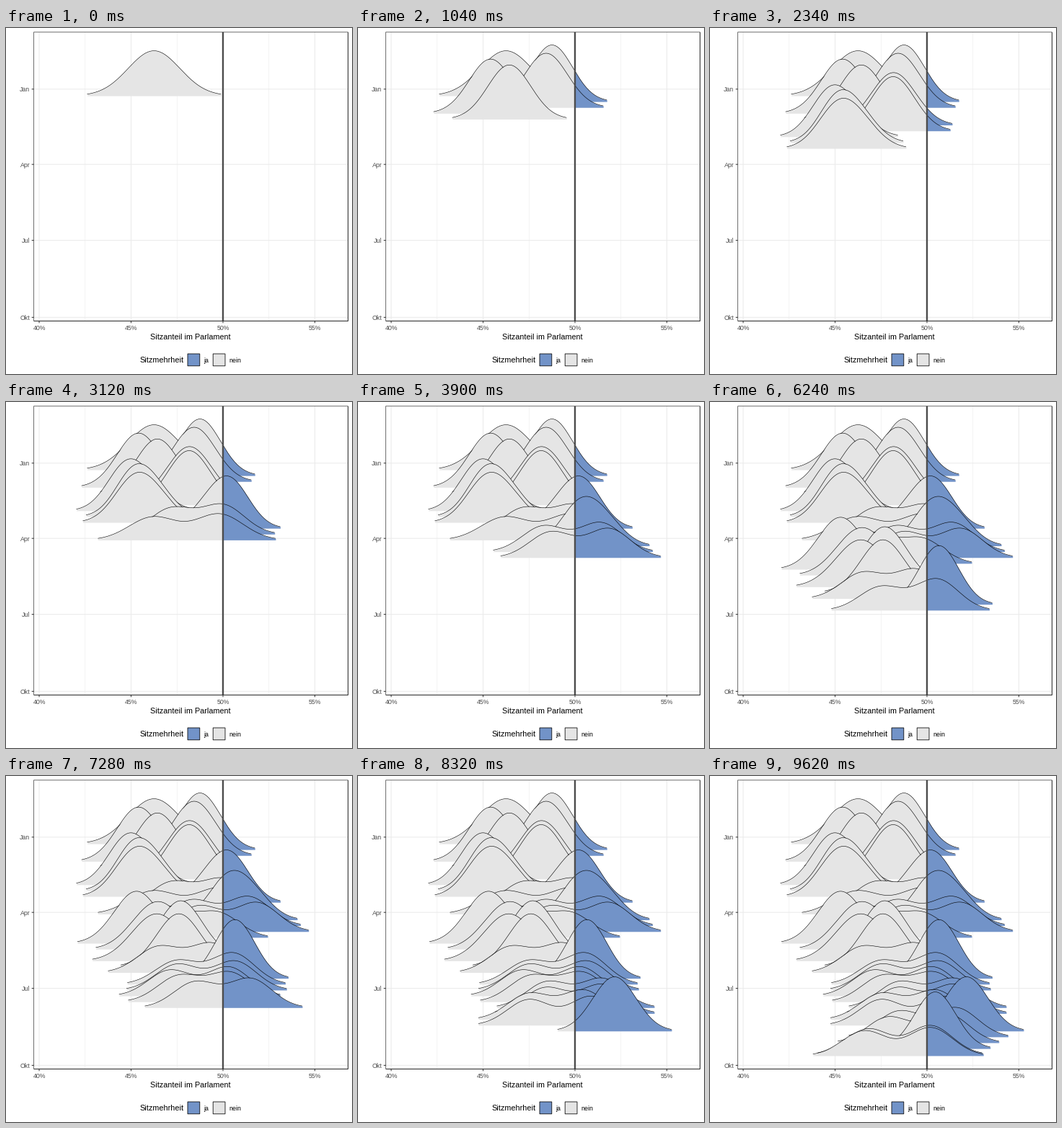
Animation, 480 px wide and 480 px high, one loop 9880 ms. Source, as a matplotlib script:

```python
import matplotlib.pyplot as plt
import numpy as np
from matplotlib.animation import FuncAnimation
from matplotlib.patches import Rectangle

STAGE, DPI = 480, 100
PX = 72 / DPI                            # points per pixel
LEFT, RIGHT, TOP, BOTTOM = 38.5, 474.5, 5.8, 406.5
MAJORITY, PERCENT = 301, 25.5            # x of 50 %, pixels per point
FIRST, WEEK, LAST = 94, 8.118, 388       # baselines: first, weekly step, last
AREA = 88                                # pixel height times percent
CUTOFF = 2.2                             # tails lower than this are dropped
YES, NO, GREY, DARK, GRID = "#7293c8", "#e5e5e5", "#4d4d4d", "#333333", "#ebebeb"

plt.rcParams["font.family"] = "Liberation Sans"
plt.rcParams["path.snap"] = False
fig = plt.figure(figsize=(STAGE / DPI, STAGE / DPI), dpi=DPI, facecolor="white")
ax = fig.add_axes([0, 0, 1, 1])
ax.set_xlim(0, STAGE)
ax.set_ylim(STAGE, 0)
ax.axis("off")


def line(xs, ys, color, width, z):
    return ax.plot(xs, ys, color=color, lw=width * PX, zorder=z,
                   solid_capstyle="butt", solid_joinstyle="round")[0]


def label(x, y, text, size, color="black", ha="left"):
    ax.text(x, y, text, fontsize=size * PX, color=color, ha=ha, va="baseline")


def share_x(percent):
    return MAJORITY + (percent - 50) * PERCENT


def draw_panel():
    for p in (42.5, 47.5, 52.5):
        line([share_x(p)] * 2, [TOP, BOTTOM], GRID, 0.55, 0)
    for p in (40, 45, 50, 55):
        x = share_x(p)
        line([x, x], [TOP, BOTTOM], GRID, 1.07, 0)
        line([x, x], [BOTTOM, BOTTOM + 2.8], DARK, 1.07, 90)
        label(x, 419, f"{p}%", 8.8, GREY, "center")
    for name, y in (("Jan", 84.8), ("Apr", 189.2), ("Jul", 294.6), ("Okt", 401.4)):
        line([LEFT, RIGHT], [y, y], GRID, 1.07, 0)
        line([LEFT - 2.8, LEFT], [y, y], DARK, 1.07, 90)
        label(33.5, y + 3.4, name, 8.8, GREY, "right")
    line([MAJORITY] * 2, [TOP, BOTTOM], GREY, 2.4, 80)
    line([LEFT, LEFT, RIGHT], [BOTTOM, TOP, TOP], DARK, 0.7, 91)
    line([LEFT, RIGHT, RIGHT], [BOTTOM, BOTTOM, TOP], DARK, 1.07, 91)


def draw_legend():
    label(256.2, 432, "Sitzanteil im Parlament", 10.75, ha="center")
    label(185.7, 464.3, "Sitzmehrheit", 10.85)
    for x, text, color in ((252, "ja", YES), (287.2, "nein", NO)):
        ax.add_patch(Rectangle((x, 452), 16.8, 16.8, fc=color, ec="black",
                               lw=0.8 * PX))
        label(x + 22.2, 464, text, 8.9)


def poll(*peaks, spread=1.17, first=0.47):
    """Density of the seat share: one bell, or two that share the weight."""
    weights = (1,) if len(peaks) == 1 else (first, 1 - first)

    def height(share):
        return sum(w * AREA / spread * np.exp(-((share - m) / spread) ** 2 / 2)
                   for m, w in zip(peaks, weights))
    return height


# one poll per week, peaks in percent
polls = [
    poll(46.25, spread=1.41),
    poll(48.75, spread=1.12),
    poll(48.43),
    poll(45.41),
    poll(46.43),
    poll(48.18, spread=1.21),
    poll(48.16),
    poll(44.75, 46.1, spread=1.06, first=0.73),
    poll(45.1, 46.4, spread=1, first=0.65),
    poll(45.1, 46.4, spread=1.08, first=0.65),
    poll(49, 50.4, spread=1.05, first=0.25),
    poll(47.2, 50),
    poll(46.2, 49.8, spread=1.3),
    poll(50.2, 51.6, spread=1.05, first=0.62),
    poll(48.3, 51.4),
    poll(48.7, 51.85),
    poll(46.9, 49.7, first=0.55),
    poll(45.3, spread=1.22),
    poll(45.9, 47.1, first=0.52),
    poll(47.7),
    poll(46.4, spread=1.35),
    poll(47.6, spread=1.2),
    poll(46.5, 49.4),
    poll(50.65, spread=1.08),
    poll(47.5, 50.55, first=0.43),
    poll(47.5, 50.65),
    poll(47.1, 50.3),
    poll(47.6, 50.4),
    poll(48.5, 51.5),
    poll(48.4, 51.5),
    poll(47.5, 50.5),
    poll(47.5, 50.9),
    poll(52.15),
    poll(48.5, 51.6),
    poll(47.9, 51.1),
    poll(50.45, spread=1.12),
    poll(46.8, 50.2),
    poll(46.6, 50.2, spread=1.2),
]


def draw_ridge(k, height):
    base = min(FIRST + WEEK * k, LAST)
    xs = np.arange(LEFT, RIGHT, 0.25)
    h = height(50 + (xs - MAJORITY) / PERCENT)
    xs, ys = xs[h > CUTOFF], base - h[h > CUTOFF]
    parts = [ax.fill_between(xs, ys, base, where=side, color=color, lw=0, zorder=k + 1)
             for side, color in ((xs <= MAJORITY, NO), (xs >= MAJORITY, YES))]
    return parts + [line(xs, ys, "black", 0.58, k + 1.5)]


def update(week):
    for k, parts in enumerate(ridges):
        for part in parts:
            part.set_visible(k <= week)
    return []


draw_panel()
draw_legend()
ridges = [draw_ridge(k, height) for k, height in enumerate(polls)]
anim = FuncAnimation(fig, update, frames=len(ridges), interval=260,
                     init_func=lambda: update(0), repeat=True, repeat_delay=0)
plt.show()
```
